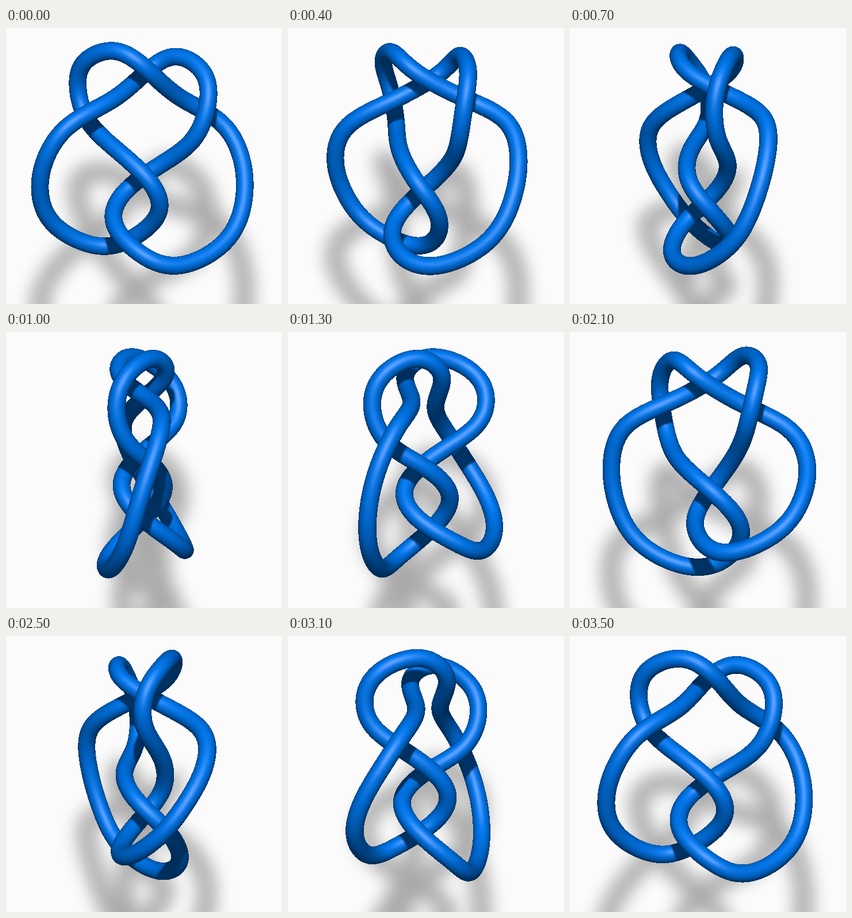
Recreate the animation shown at these times as an HTML page with a canvas. Size 480 by 480 pixels, loop 3.6 s.

```html
<!DOCTYPE html>
<html lang="en">
<head>
<meta charset="utf-8">
<title>Rotating knot</title>
<style>
  html, body { margin: 0; width: 100%; height: 100%; overflow: hidden; background: #fbfbfb; }
  #stage { position: relative; width: 100%; height: 100%; overflow: hidden; contain: strict; }
  canvas { position: absolute; left: 0; top: 0; }
  #wall { filter: blur(15px); opacity: .32; }
</style>
</head>
<body>
<div id="stage">
  <canvas id="wall" width="480" height="560"></canvas>
  <canvas id="tube" width="480" height="480"></canvas>
</div>
<script>
const SIZE = 480, WALL_H = 560, CX = 239.5, CY = 240;
const LOOP = 3600, STEP = 100;
const RADIUS = 15.4, CAMERA = 5000;
const SLOPE = 0.4, WALL = 500;   // light falls down by SLOPE per unit of depth
const MAP_H = 720, MAP_TOP = 120;
const EMPTY = -1e4;

// Half of the knot; the other half is its half-turn about the vertical axis.
const half = [
  [73, 395, 54], [7, 378, 57], [-38, 330, 12], [-21, 275, -32], [40, 223, -19],
  [92, 176, 24], [113, 116, 33], [101, 66, 6], [50, 45, -32], [-4, 77, -38],
  [-60, 123, 23], [-130, 165, 57], [-170, 226, 45], [-177, 294, 15], [-147, 358, -19]
];

// Slow waves along the string make the two halves slightly unequal.
const knots = [...half, ...half].map(([x, y, z], i) => {
  const side = i < half.length ? 1 : -1;
  const wave = (size, n, phase) =>
    size * Math.cos(n * i * Math.PI / half.length - phase * Math.PI / 180);
  return [
    side * x - 4 + wave(-9, 2, 48),
    y + wave(14, 1, 39) + wave(5, 5, -28),
    side * z + wave(7, 4, 90) + wave(6, 6, 144)
  ];
});

// Closed cubic B-spline whose controls are relaxed until it meets every point
function spline(pts, per) {
  const n = pts.length;
  const near = (list, i) => [-1, 0, 1, 2].map(k => list[(i + k + n) % n]);
  let ctrl = pts;
  for (let pass = 0; pass < 20; pass++) {
    ctrl = ctrl.map((p, i) => {
      const [a, b, c] = near(ctrl, i);
      return p.map((q, k) => q + pts[i][k] - (a[k] + 4 * b[k] + c[k]) / 6);
    });
  }
  const out = [];
  for (let i = 0; i < n * per; i++) {
    const t = (i % per) / per, u = 1 - t;
    const [a, b, c, d] = near(ctrl, Math.floor(i / per));
    out.push(a.map((q, k) => (u ** 3 * q + (3 * t ** 3 - 6 * t * t + 4) * b[k] +
      (3 * u ** 3 - 6 * u * u + 4) * c[k] + t ** 3 * d[k]) / 6));
  }
  return out;
}

const curve = spline(knots, 44);

function pose(angle) {
  const c = Math.cos(angle), s = Math.sin(angle);
  return curve.map(([x, y, z]) => {
    const depth = x * s + z * c, k = CAMERA / (CAMERA - depth);
    return { x: CX + (x * c - z * s) * k, y: CY + (y - CY) * k, z: depth, r: RADIUS * k };
  });
}

const wall = document.getElementById('wall').getContext('2d');
const tube = document.getElementById('tube').getContext('2d');
const image = tube.createImageData(SIZE, SIZE);
const depth = new Float32Array(SIZE * SIZE);
const normX = new Float32Array(SIZE * SIZE);
const normY = new Float32Array(SIZE * SIZE);
const lightMap = new Float32Array(SIZE * MAP_H);

function drawWall(pts) {
  wall.clearRect(0, 0, SIZE, WALL_H);
  wall.lineWidth = 2 * RADIUS + 2;
  wall.lineJoin = 'round';
  wall.beginPath();
  for (const p of pts) wall.lineTo(p.x, p.y + SLOPE * (p.z + WALL));
  wall.closePath();
  wall.stroke();
}

// Calls put(index, dx, dy) for each pixel of a disc
function disc(cx, cy, r, height, put) {
  const y1 = Math.min(height - 1, Math.floor(cy + r));
  for (let y = Math.max(0, Math.ceil(cy - r)); y <= y1; y++) {
    const dy = y - cy, reach = Math.sqrt(Math.max(0, r * r - dy * dy));
    const x1 = Math.min(SIZE - 1, Math.floor(cx + reach));
    for (let x = Math.max(0, Math.ceil(cx - reach)); x <= x1; x++) put(y * SIZE + x, x - cx, dy);
  }
}

function sweep(pts) {
  depth.fill(EMPTY);
  lightMap.fill(EMPTY);
  for (const { x, y, z, r } of pts) {
    disc(x, y, r, SIZE, (i, dx, dy) => {
      const front = z + Math.sqrt(Math.max(0, r * r - dx * dx - dy * dy));
      if (front > depth[i]) {
        depth[i] = front;
        normX[i] = dx / r;
        normY[i] = dy / r;
      }
    });
    disc(x, y + SLOPE * z + MAP_TOP, r, MAP_H, i => {
      if (z > lightMap[i]) lightMap[i] = z;
    });
  }
}

const taps = [[0, 0], [-2, 0], [2, 0], [0, -2], [0, 2]];

function litPart(x, y, z) {
  const v = Math.round(y + SLOPE * z + MAP_TOP);
  const open = taps.filter(([dx, dy]) => lightMap[(v + dy) * SIZE + x + dx] < z + 9);
  return open.length / taps.length;
}

const unit = v => v.map(q => q / Math.hypot(...v));
const light = unit([0, -SLOPE, 1]);
const halfway = unit([light[0], light[1], light[2] + 1]);

function shade() {
  const px = image.data;
  px.fill(0);
  for (let i = 0; i < depth.length; i++) {
    if (depth[i] === EMPTY) continue;
    const nx = normX[i], ny = normY[i];
    const nz = Math.sqrt(Math.max(0, 1 - nx * nx - ny * ny));
    const dot = v => Math.max(0, nx * v[0] + ny * v[1] + nz * v[2]);
    const lit = litPart(i % SIZE, Math.floor(i / SIZE), depth[i]);
    const d = 0.34 + 0.08 * nz + 0.6 * lit * dot(light);
    const s = lit * dot(halfway) ** 20;
    px[4 * i] = 95 * s;
    px[4 * i + 1] = 122 * d + 38 * s;
    px[4 * i + 2] = 242 * d + 15 * s;
    px[4 * i + 3] = 255;
  }
  tube.putImageData(image, 0, 0);
}

const start = performance.now();
let shown = -1;

function frame() {
  const step = Math.floor(((performance.now() - start) % LOOP) / STEP);
  if (step !== shown) {
    shown = step;
    const pts = pose(step * STEP / LOOP * 2 * Math.PI);
    drawWall(pts);
    sweep(pts);
    shade();
  }
  requestAnimationFrame(frame);
}
frame();
</script>
</body>
</html>
```
